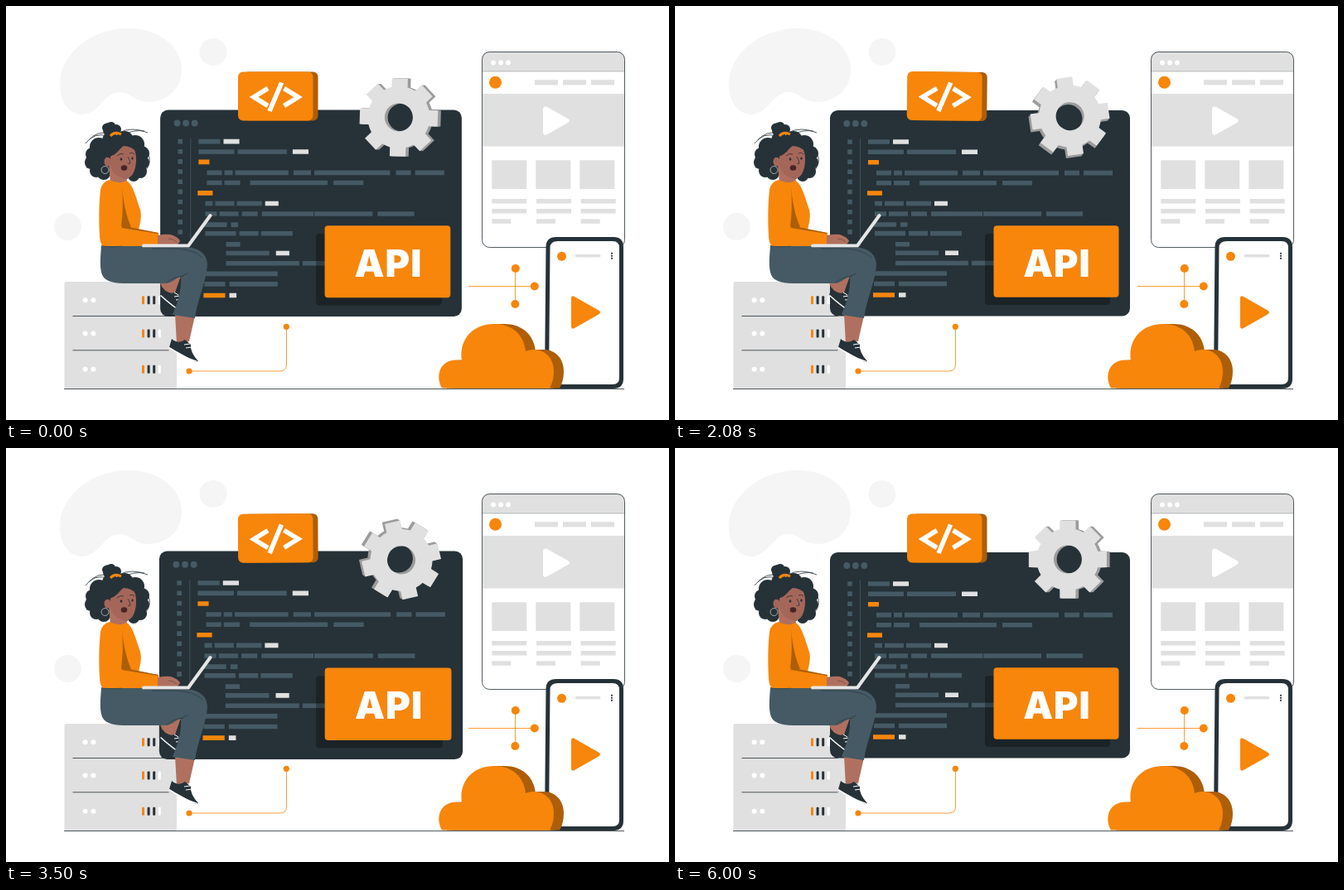
Recreate the animation shown at these times as an HTML page. Size 800x500 px, loop 6040 ms.

```html
<!DOCTYPE html>
<html lang="en">
<head>
<meta charset="utf-8">
<title>API</title>
<style>
html, body { margin: 0; width: 100%; height: 100%; overflow: hidden; background: #fff }
svg { display: block; width: 800px; height: 500px }
.o { fill: #f7860b } .b { fill: #ad5e07 } .d { fill: #263238 } .s { fill: #455a64 }
.g { fill: #e0e0e0 } .w { fill: #fff } .p { fill: #f5f5f5 } .k { fill: #b0705f }
.line { fill: none; stroke: #263238; stroke-width: .8 }
.wire { fill: none; stroke: #f7860b; stroke-width: .8 }
.code path { stroke-width: 5.6 }
text { font: 900 45px Inter, "Open Sans", sans-serif; letter-spacing: 1px; text-anchor: middle }
</style>
</head>
<body>
<svg viewBox="0 0 800 500">
  <defs>
    <path id="cloud" d="M526 461.5C518 447 523 428 543 427.5Q547 427 550 428.5C546 402 564 384 589 384C611 384 625 397 627 417C645 410 661 422 661 441Q661 453 656 461.5Z"/>
    <path id="cog" fill-rule="evenodd"/>
  </defs>

  <!-- backdrop -->
  <g class="p">
    <path d="M65 92C66 60 100 28 145 27C185 26 213 50 212 78C211 104 190 116 172 116C155 116 150 104 137 104C118 104 112 131 92 131C76 131 64 115 65 92Z"/>
    <circle cx="250" cy="55.5" r="16.5"/><circle cx="74.5" cy="266.5" r="16.5"/>
  </g>

  <!-- browser -->
  <rect class="w" x="574.5" y="55.5" width="172" height="236" rx="9"/>
  <path class="g" d="M574.5 79V64.500q0-9 9-9h154q9 0 9 9V79ZM575 106h171v63.500h-171Z"/>
  <rect class="line" x="574.5" y="55.5" width="172" height="236" rx="9"/>
  <path class="line" d="M574.5 79h172" opacity=".35"/>
  <g class="w"><circle cx="588" cy="68.5" r="2.9"/><circle cx="597" cy="68.5" r="2.9"/><circle cx="606" cy="68.5" r="2.9"/></g>
  <circle class="o" cx="590.5" cy="92.3" r="7.5"/>
  <path class="w" d="M648 125q0-5 5-3l25 14q4 2.500 0 5l-25 14q-5 2.500-5-3Z"/>
  <g class="g" id="tiles"></g>

  <!-- phone -->
  <path class="d" d="M664 279h69q12 0 12 12v159q0 12-12 12h-71q-12 0-12-12l1.500-159q0-12 12.500-12Z"/>
  <path class="w" d="M666 284h66q8 0 8 8v157q0 8-8 8h-69q-8 0-8-8l1.500-157q0-8 9.500-8Z"/>
  <circle class="o" cx="670.5" cy="302.3" r="5.5"/>
  <rect class="g" x="686.500" y="300" width="31" height="3.6" rx="1.8"/>
  <g class="d"><circle cx="731" cy="298.8" r="1.1"/><circle cx="731" cy="301.8" r="1.1"/><circle cx="731" cy="304.8" r="1.1"/></g>
  <path class="o" d="M682 353q0-4 4-2l29 16.500q4 2.500 0 5l-29 16.500q-4 2-4-2Z"/>

  <!-- server -->
  <rect class="g" x="70.5" y="333" width="135.500" height="129.5" rx="2"/>
  <path class="line" d="M80.500 374.500h116M80.500 415.800h116"/>
  <g id="slots"></g>
  <path class="line" d="M70 462.500h676"/>

  <use href="#cloud" x="12" class="b"/><use href="#cloud" x="6" class="b"/><use href="#cloud" class="o"/>

  <!-- code screen -->
  <g id="screen">
    <rect class="d" x="187" y="126" width="362" height="248.500" rx="9.5"/>
    <g class="s"><circle cx="207.300" cy="142" r="3.900"/><circle cx="217.800" cy="142" r="3.900"/><circle cx="228.300" cy="142" r="3.900"/></g>
    <path d="M211 161.200V277" stroke="#455a64" stroke-width="5.600" stroke-dasharray="5.600 6.500"/>
    <path d="M223.500 160V290" stroke="#455a64" stroke-width=".8"/>
    <g class="code">
      <path stroke="#455a64" d="M233 164h26M233 176.300h43m4 0h59M243 201.600h18m3 0h10m3 0h64m6 0h21m4 0h91m7 0h18m5 0h35M243 213.700h18m3 0h19m12 0h93m7 0h36M241 238.500h9m3 0h23m3 0h30M241 251h14m3 0h23m4 0h19m5 0h62m1 0h70m6 0h44M240 264h27m5 0h8.500M241 274.600h37m4 0h23m3 0h38M266 287.700h17M266 298.300h52M266 310.500h88m4 0h40M240 323h88M240 335.500h25m5 0h58"/>
      <path stroke="#e0e0e0" d="M263 164h19M346 176.300h19M313 238.500h16M326 298.300h16M270 349h8.500"/>
      <path stroke="#f7860b" d="M233 188.700h13M232 226h18M239 349h26"/>
    </g>
    <rect x="374" y="275" width="151" height="86" rx="4" opacity=".3"/>
    <rect class="o" x="384.500" y="265.300" width="151" height="86.500" rx="4"/>
    <text class="w" x="461" y="326.500">API</text>
  </g>

  <!-- wires -->
  <path class="wire" d="M558 338.500h80M614.500 317v43M338.500 387v46q0 8-8 8H221"/>
  <g class="o">
    <circle cx="614.800" cy="317" r="5"/><circle cx="614.300" cy="360" r="5"/><circle cx="637.800" cy="338.500" r="5"/>
    <circle cx="338.300" cy="387.300" r="3.600"/><circle cx="221" cy="441" r="3.600"/>
  </g>

  <!-- sign -->
  <g id="sign">
    <rect class="b" x="286" y="79.500" width="90.500" height="59" rx="6"/>
    <rect class="o" x="280" y="79.500" width="90.500" height="59" rx="6"/>
    <path fill="none" stroke="#fff" stroke-width="5.600" d="M316 99.500L299 110L316 120.500M335.500 99.500L352.500 110L335.500 120.500M332.500 92.500L318 127"/>
  </g>

  <!-- gear -->
  <g id="gear">
    <circle class="d" r="19"/>
    <g fill="#9c9c9c"><use href="#cog" x="2"/><use href="#cog" x=".8"/><use href="#cog" x="-.4"/></g>
    <use href="#cog" x="-1.700" class="g"/>
  </g>

  <!-- woman: legs -->
  <path class="k" d="M184 330L211 326L203 349L190 343ZM204 372L228 374L221 405L206 408Z"/>
  <path class="d" d="M189 340Q195 349 203 346L211 350Q209 360 218 372L215 373L186 349ZM200 402Q208 409 216 403L223 409Q222 418 232 429L229 430L197 412Z"/>
  <path fill="none" stroke="#fff" stroke-width="1.500" d="M186.500 349.500Q200 362 216.500 372.500M197 412.500Q211 423 230.500 429.500"/>
  <path fill="none" stroke="#fff" stroke-width="1" d="M203 351l7-1m-5 5l7-1m-9-8l5 3M215 409l7-1m-5 5l7-1"/>
  <path class="s" d="M115 289C114 304 112 320 118 328C124 335 138 335 152 335L190 335C200 336 203 329 211 327C212 344 207 358 201 373L228 377C231 354 242 332 243 313C243 297 229 291 215 291Z"/>
  <path class="line" d="M176 293C200 293 224 291 237 304M211 327Q215 324 219 323M194 334Q202 327 214 326" opacity=".7"/>

  <!-- woman: head -->
  <g class="d" id="hair"></g>
  <path class="line" d="M96 166Q106 152 123 157M100 162Q110 150 126 154M136 153Q152 145 171 153M140 156Q154 149 167 151M117 146Q120 139 131 142M98 196Q94 188 99 179M168 199Q177 189 171 177"/>
  <path class="k" d="M124 190L126 214Q136 219 146 213L145 202Z"/>
  <path fill="#854c43" d="M131 199Q136 208 147 209L146 203Z"/>
  <path fill="#a5665a" d="M126 182C130 174 134 168 143 167C153 166 157 174 157 185C157 197 153 208 145 208C135 208 128 202 126 192Z"/>
  <ellipse cx="122.500" cy="188" rx="4" ry="5.500" fill="#a5665a"/>
  <circle cx="119.500" cy="198" r="4.500" fill="none" stroke="#c8c8c8" stroke-width=".8"/>
  <path class="d" d="M122 183C121 169 132 161 146 164Q155 167 158 176Q150 169 142 169C137 172 134 179 127 181Z"/>
  <path class="line" d="M134 181q4-4 8-2M149 178q4-2 6 1M147 182q3 5 3 8l-3 .5"/>
  <ellipse class="d" cx="139" cy="185" rx="1.300" ry="1.800"/><ellipse class="d" cx="152.500" cy="184" rx="1.200" ry="1.700"/>
  <ellipse cx="142.500" cy="195.500" rx="3.800" ry="3.200" fill="#4a2526"/>
  <path d="M126 157Q131 151 139 155" fill="none" stroke="#f7860b" stroke-width="3"/>

  <!-- woman: body and laptop -->
  <path class="o" d="M125 210Q116 212 114 222C112 240 112 262 113 277Q113 286 117 290L184 290V274L160 270C162 262 164 254 162 246C157 232 153 214 145 211Q136 216 125 210Z"/>
  <path class="b" d="M140 219C142 240 146 256 151 267L139 266Q142 244 140 219ZM139 265L184 274L183 275L140 268Z"/>
  <path class="line" d="M117 290Q128 292 140 290" opacity=".5"/>
  <path class="k" d="M183 277Q192 275 199 276Q208 279 210 284L207 288H183Z"/>
  <path class="line" d="M196 281q6 0 10 4" opacity=".5"/>
  <path fill="none" stroke="#e6e6e6" stroke-width="4" stroke-linejoin="round" d="M166 289.500H220L246.500 253" stroke-linecap="round"/>
  <path class="line" d="M166 291.700H220" opacity=".4"/>
</svg>
<script>
const $ = id => document.getElementById(id);
const rect = (x, y, w, h, c = '', r = 0) =>
  `<rect x="${x}" y="${y}" width="${w}" height="${h}" rx="${r}" class="${c}"/>`;
const dot = (x, y, r, c = '') => `<circle cx="${x}" cy="${y}" r="${r}" class="${c}"/>`;

$('tiles').innerHTML = [0, 1, 2].map(i => {
  const x = 586.3 + 53.7 * i;
  return rect(638 + 34 * i, 89.2, 28, 6.2) + rect(586.3 + 53 * i, 186.3, 42, 34.700) +
    rect(x, 233, 42, 5.5) + rect(x, 245, 42, 5.5) + rect(x, 257.3, 23, 5.5);
}).join('');

$('slots').innerHTML = [355.3, 395.5, 438.8].map(y =>
  dot(95.6, y, 3, 'w') + dot(105.4, y, 3, 'w') +
  ['o', 'd', 'd', 'w'].map((c, i) => rect(164 + 6.6 * i, y - 5, 3, 10, c, 1)).join('')
).join('');

$('hair').innerHTML = [
  [126, 150, 9], [121, 147, 5], [133, 149, 6], [127, 145, 5], [112, 170, 11], [104, 179, 8],
  [103, 189, 8], [109, 199, 8], [118, 202, 8], [126, 162, 10], [143, 162, 11], [156, 167, 11],
  [164, 178, 9], [165, 189, 8], [162, 200, 8], [154, 205, 7], [114, 186, 15], [142, 182, 24]
].map(c => dot(...c)).join('');

// eight tapered teeth around a round hole
const polar = (r, a) => `${(r * Math.cos(a)).toFixed(2)} ${(r * Math.sin(a)).toFixed(2)}`;
let cog = '';
for (let i = 0; i < 8; i++) {
  const a = i * Math.PI / 4;
  cog += `${i ? 'A37.500 37.500 0 0 1' : 'M'}${polar(37.5, a - .26)}L${polar(48, a - .2)}L${polar(48, a + .2)}L${polar(37.5, a + .26)}`;
}
$('cog').setAttribute('d', cog + 'A37.500 37.500 0 0 1' + polar(37.5, -.26) + 'ZM17 0A17 17 0 1 0-17 0A17 17 0 1 0 17 0Z');

// linear interpolation through [position, value] pairs
function track(p, keys) {
  const i = Math.max(1, keys.findIndex(k => k[0] >= p));
  const [a, u] = keys[i - 1], [b, v] = keys[i];
  return u + (v - u) * (p - a) / (b - a);
}
const beat = [[0, 1], [.1, 1.1], [.3, 1], [.4, 1], [.5, 1.1], [.6, 1], [1, 1]];
const sway = [[0, 0], [.25, 1], [.75, -1], [1, 0]];

function draw(now) {
  const p = Math.min((now % 6040 + 28) / 6000, 1);
  $('screen').setAttribute('transform', `translate(368.2 250.2) scale(${track(p, beat)}) translate(-368.2 -250.2)`);
  $('sign').setAttribute('transform', `rotate(${track(p, sway)} 328.2 109)`);
  $('gear').setAttribute('transform', `translate(475.6 134.500) rotate(${360 * p})`);
}
const start = performance.now();
function tick() {
  draw(performance.now() - start);
  requestAnimationFrame(tick);
}
tick();
</script>
</body>
</html>
```
